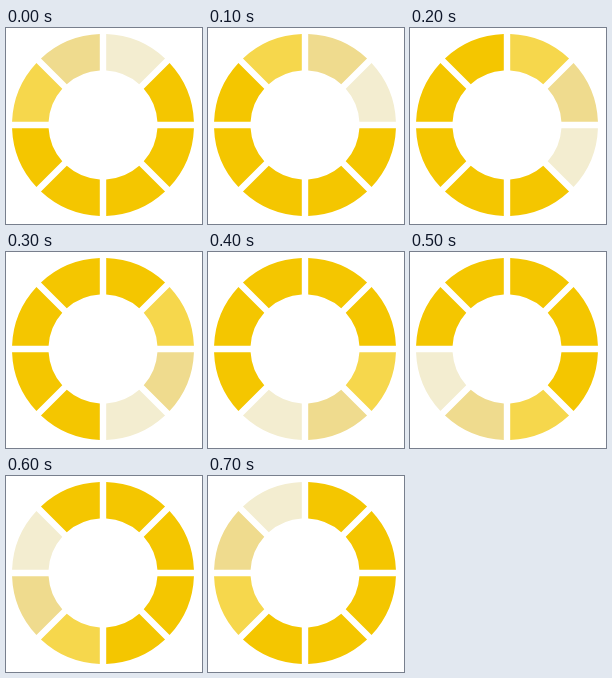
An HTML page with a canvas that plays this animation: 196x196 px, repeating every 800 ms.

```html
<!DOCTYPE html>
<html>
<head>
<meta charset="utf-8">
<style>
html, body { margin: 0; width: 100%; height: 100%; overflow: hidden; background: #fff; }
canvas { display: block; }
</style>
</head>
<body>
<canvas id="ring" width="196" height="196"></canvas>
<script>
const ctx = document.getElementById('ring').getContext('2d');
const COUNT = 8, STEP = 100, CENTER = 97, OUTER = 91, INNER = 54.5, GAP = 6.4;
const MAIN = '#f4c600';
const TAIL = ['#f3edd0', '#efdb8e', '#f6d74c']; // lightest segment first
const ARC = Math.PI * 2 / COUNT;

// Segment with edges parallel to its neighbours' across an even gap
function segment(i, color) {
  const start = i * ARC - Math.PI / 2, end = start + ARC;
  const outer = Math.asin(GAP / 2 / OUTER), inner = Math.asin(GAP / 2 / INNER);
  ctx.beginPath();
  ctx.arc(CENTER, CENTER, OUTER, start + outer, end - outer);
  ctx.arc(CENTER, CENTER, INNER, end - inner, start + inner, true);
  ctx.fillStyle = color;
  ctx.fill();
}

function draw(now) {
  const head = Math.floor(now / STEP) % COUNT;
  ctx.clearRect(0, 0, 196, 196);
  for (let i = 0; i < COUNT; i++) {
    segment(i, TAIL[(head - i + COUNT) % COUNT] || MAIN);
  }
}

const begin = performance.now();
function tick() {
  draw(performance.now() - begin);
  requestAnimationFrame(tick);
}
tick();
</script>
</body>
</html>
```
